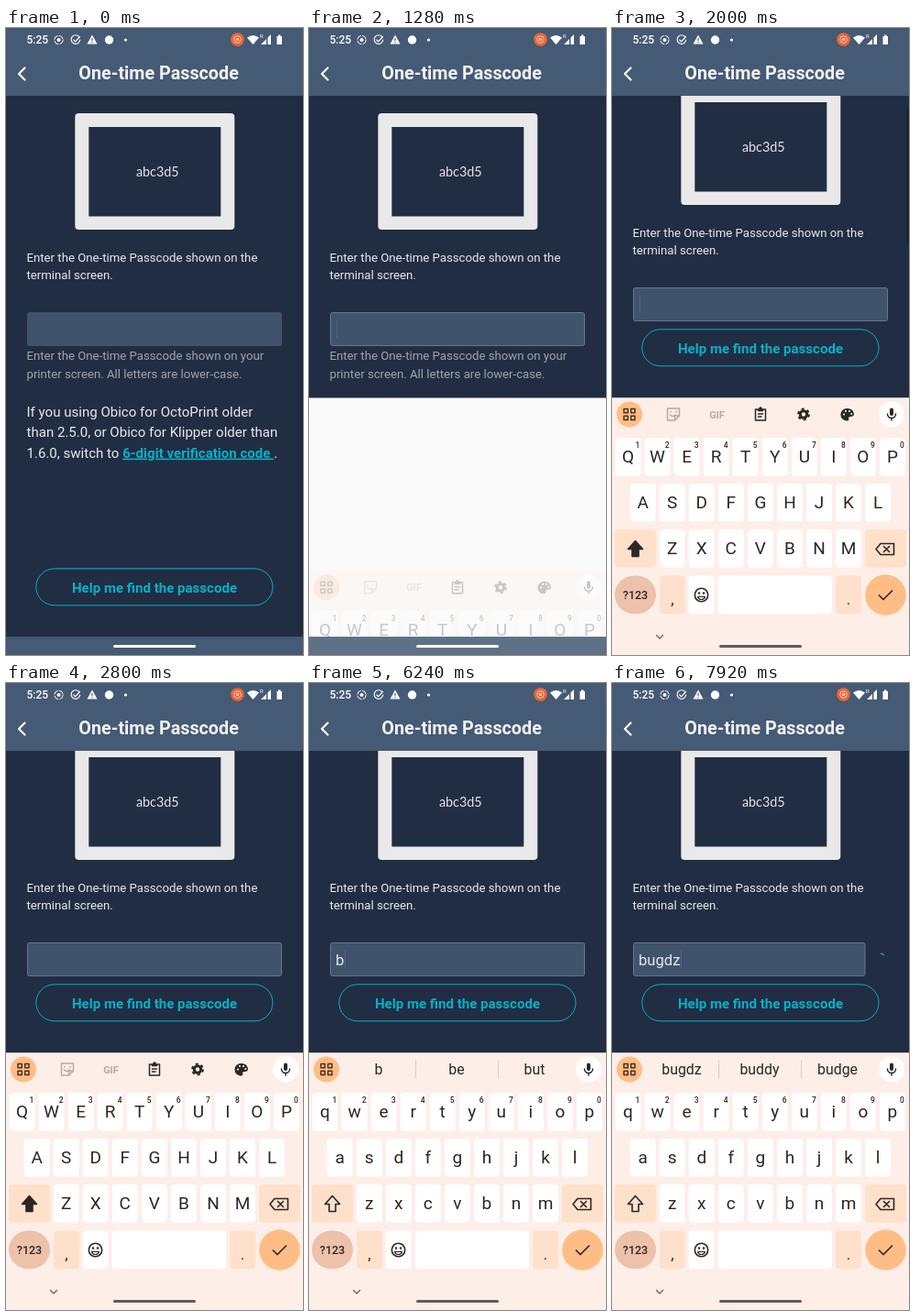
An HTML page that plays this animation: 324 by 684 pixels, repeating every 8000 ms.

```html
<!DOCTYPE html>
<html lang="en">
<head>
<meta charset="utf-8">
<title>One-time Passcode</title>
<style>
  html, body { margin: 0; width: 100%; height: 100%; overflow: hidden; background: #212d42; }
  svg { display: block; width: 324px; height: 684px; font-family: Roboto, sans-serif; }
  text { white-space: pre; }
  .mid { text-anchor: middle; }
  .line { fill: none; stroke-linecap: round; stroke-linejoin: round; }
</style>
</head>
<body>
<svg viewBox="0 0 324 684">
  <defs>
    <clipPath id="view"><rect id="viewBox" y="74" width="324" height="590"/></clipPath>
  </defs>
  <rect width="324" height="684" fill="#212d42"/>

  <g clip-path="url(#view)">
    <g id="page">
      <rect x="75.300" y="93" width="174" height="127" rx="4" fill="#e9e9e9"/>
      <rect x="90.300" y="108" width="144" height="97.500" fill="#212d42"/>
      <text class="mid" x="165.300" y="162" font-family="Lato, sans-serif" font-size="14.400" fill="#e3e5e8">abc3d5</text>
      <g font-size="13.200" fill="#e8eaee">
        <text x="22.500" y="254.500">Enter the One-time Passcode shown on the</text>
        <text x="22.500" y="274.300">terminal screen.</text>
      </g>
      <rect id="field" x="23.500" y="310.500" width="277" height="36" rx="2" fill="#40536c" stroke="#40536c"/>
      <text id="typed" x="29" y="335" font-size="16.600" fill="#e3e7ec"></text>
      <rect id="caret" y="318" width="1" height="20" fill="#4d6682"/>
      <path id="spinner" class="line" stroke="#06b1c9" stroke-width="1.200"/>
      <g font-size="13.200" fill="#a0a5ad">
        <text x="22.500" y="362">Enter the One-time Passcode shown on your</text>
        <text x="22.500" y="382">printer screen. All letters are lower-case.</text>
      </g>
      <g font-size="15.050" fill="#e8eaee">
        <text x="22.500" y="424">If you using Obico for OctoPrint older</text>
        <text x="22.500" y="446.300">than 2.5.0, or Obico for Klipper older than</text>
        <text x="22.500" y="468.600">1.6.0, switch to <tspan font-weight="700" fill="#06b1c9" text-decoration="underline">6-digit verification code </tspan>.</text>
      </g>
    </g>
  </g>
  <rect id="scrollbar" x="321" y="88" width="3" height="147" rx="1" fill="#182131"/>

  <g id="help">
    <rect x="32.800" y="589.800" width="258.200" height="40" rx="20" fill="none" stroke="#06b1c9"/>
    <text class="mid" x="162" y="615.500" font-size="15.050" font-weight="700" fill="#06b1c9">Help me find the passcode</text>
  </g>

  <rect width="324" height="74" fill="#455a74"/>
  <path class="line" d="M20.500 43.500L14 50L20.500 56.500" stroke="#fff" stroke-width="2.200"/>
  <text class="mid" x="166.600" y="56.300" font-size="19.750" font-weight="700" fill="#f0f2f5">One-time Passcode</text>
  <g fill="#fff">
    <text x="22.500" y="17" font-size="12" font-weight="500">5:25</text>
    <circle cx="57.500" cy="13" r="4.700" fill="none" stroke="#fff" stroke-dasharray="6 1.400"/>
    <circle cx="57.500" cy="13" r="2"/>
    <path class="line" stroke="#fff" stroke-width="1.200" d="M80 10A4.800 4.800 0 1 0 80.700 13M73.800 13L75.600 14.800L80.500 9.500"/>
    <path d="M94 7.500L99.500 17.500H88.500Z"/>
    <path d="M94 11V14M94 15V16.200" stroke="#455a74" stroke-width="1.200"/>
    <circle cx="112.500" cy="13" r="4.700"/>
    <circle cx="130.500" cy="13" r="1.600"/>
    <circle cx="252.500" cy="12.500" r="7.300" fill="#e8653a"/>
    <circle cx="252.500" cy="12.500" r="3.800" fill="none" stroke="#fbd5c6" stroke-width=".9"/>
    <circle cx="252.500" cy="12.500" r="1.600" fill="#fbd5c6"/>
    <path d="M263 10.500Q269.500 5.500 276 10.500L269.500 18Z"/>
    <text x="277" y="11" font-size="6">R</text>
    <path d="M278 18L284 12V18ZM285.500 18V10.500L289 7V18Z"/>
    <path d="M295.500 9H297V7.500H299.500V9H301V18H295.500Z"/>
  </g>

  <rect id="panel" y="403.500" width="324" height="281" fill="#fafafa"/>
  <g id="keyboard"></g>
  <rect id="navBar" y="664" width="324" height="20" fill="#455a74"/>
  <rect id="pill" x="117" y="673" width="90" height="3" rx="1.500"/>
</svg>
<script>
const el = id => document.getElementById(id);
const set = (id, attrs) => { for (const k in attrs) el(id).setAttribute(k, attrs[k]); };
const show = (id, on) => set(id, { visibility: on ? 'visible' : 'hidden' });
const ramp = (t, from, to) => Math.min(1, Math.max(0, (t - from) / (to - from)));

const INK = '#2b2725', PEACH = '#ffe0cb', ORANGE = '#ffbd86';
const label = (x, y, size, text, extra = '') =>
  `<text class="mid" x="${x}" y="${y}" font-size="${size}" fill="${INK}" ${extra}>${text}</text>`;
const key = (x, y, w, fill = '#fff', r = 4) =>
  `<rect x="${x}" y="${y}" width="${w}" height="41.500" rx="${r}" fill="${fill}"/>`;
const icon = (d, color = INK, width = 1.500) =>
  `<path class="line" d="${d}" stroke="${color}" stroke-width="${width}"/>`;
const dots = (r, fill, ...points) =>
  points.map(([x, y]) => `<circle cx="${x}" cy="${y}" r="${r}" fill="${fill}"/>`).join('');

function letterRow(letters, x, y, digits) {
  return [...letters].map((c, i) => {
    const cx = x + i * 32.05;
    return key(cx - 14, y, 28) + label(cx, y + 27.3, 19, c, 'data-letter') +
      (digits ? label(cx + 10.5, y + 11, 8.5, (i + 1) % 10, 'font-weight="500"') : '');
  }).join('');
}

const tools =
  icon('M60.500 415H73.500V423L68.500 428H60.500ZM73.500 423H68.500V428M63.500 422Q66 425 69 422M64 418.500V419M70 418.500V419', '#b5aaa6') +
  label(114.500, 425.500, 11, 'GIF', 'font-weight="700" style="fill:#b5aaa6"') +
  icon('M156.500 416H167.500V428H156.500ZM159.500 416V417.500H164.500V416M159.500 421H164.500M159.500 424H163') +
  dots(1.8, INK, [162, 415]) +
  `<circle cx="209" cy="421.500" r="3.700" fill="none" stroke="${INK}" stroke-width="3"/>
   <circle cx="209" cy="421.500" r="5.900" fill="none" stroke="${INK}" stroke-width="2" stroke-dasharray="3.100 3.080"/>` +
  `<path d="M257 415A6.800 6.800 0 1 0 257 428.500Q259 428 258 425.500Q258 424 260 424Q264 424 264 421Q263 415 257 415Z" fill="${INK}"/>` +
  dots(1.1, '#feeee8', [253, 421.5], [255, 418], [259, 418], [261.3, 421]);

const suggestions = [76, 161, 246].map(x => label(x, 426.5, 15.9, '', 'data-word')).join('') +
  icon('M116.500 412V431M206.500 412V431', '#d9cdc8', 1);

el('keyboard').innerHTML =
  '<rect y="403.500" width="324" height="281" fill="#feeee8"/>' +
  dots(14, ORANGE, [19, 421.5]) +
  icon('M13 415.500H17.300V419.800H13ZM20.700 415.500H25V419.800H20.700ZM13 423.200H17.300V427.500H13ZM20.700 423.200H25V427.500H20.700Z', '#4a3020') +
  `<g id="tools">${tools}</g><g id="suggestions">${suggestions}</g>` +
  dots(14, '#fff', [305, 421.5]) +
  `<rect x="303" y="414.500" width="4" height="8.500" rx="2" fill="${INK}"/>` +
  icon('M300.500 421A4.500 4.500 0 0 0 309.500 421M305 425.500V428') +
  letterRow('QWERTYUIOP', 17.5, 447, true) +
  letterRow('ASDFGHJKL', 33.7, 497) +
  letterRow('ZXCVBNM', 65.7, 547) +
  key(3, 547, 45, PEACH) + key(276, 547, 45, PEACH) +
  `<path id="shift" d="M25.500 559.500L33.500 568.500H29V576.500H22V568.500H17.500Z" stroke="${INK}" stroke-width="1.600" stroke-linejoin="round"/>` +
  icon('M288 568.500L293 562.500H307.500V574.500H293ZM296.500 565.500L302.500 571.500M302.500 565.500L296.500 571.500', INK, 1.6) +
  key(3, 597.500, 45, '#eec1aa', 21) + label(25.500, 623, 12.5, '?123', 'font-weight="500"') +
  key(52, 597.500, 28, PEACH) + label(66, 629, 17, ',') +
  key(83.500, 597.500, 28) +
  `<circle cx="97.500" cy="618.500" r="7.200" fill="none" stroke="${INK}" stroke-width="1.600"/>` +
  icon('M93.500 620.500H101.500Q100.500 623.500 97.500 623.500Q94.500 623.500 93.500 620.500Z', INK, 1.2) +
  dots(1.2, INK, [95, 616.5], [100, 616.5]) +
  key(115.500, 597.500, 124.500) +
  key(244, 597.500, 28, PEACH) + label(258, 629, 17, '.') +
  dots(22.3, ORANGE, [298.5, 618.5]) +
  icon('M291.500 619L296 623.500L305.500 614', INK, 1.7) +
  icon('M48.500 662.500L52 666L55.500 662.500', '#6b5f5a', 1.3);

const letters = [...document.querySelectorAll('[data-letter]')];
const words = [...document.querySelectorAll('[data-word]')];

const LOOP = 8000, FOCUS = 1200, RESIZE = 1340, LOWER = 5680, VERIFY = 7760;
const strokes = [
  [6080, 'b', 'be', 'but'],
  [6480, 'bu', 'but', 'bus'],
  [6800, 'bug', 'bugs', 'big'],
  [7360, 'bugd', 'budget', 'bugs'],
  [VERIFY, 'bugdz', 'buddy', 'budge'],
];

function draw(t) {
  // Keyboard slides up while fading in
  const rise = 1 - (1 - ramp(t, 1184, 1480) ** 2) ** 3.5;
  set('keyboard', { transform: `translate(0 ${281 * (1 - rise)})`, opacity: rise ** 1.3 });
  show('panel', t >= 1240);
  set('navBar', { opacity: 1 - ramp(t, 1260, 1400) });
  const dark = ramp(t, 1380, 1900);
  const mix = (a, b) => Math.round(a + (b - a) * dark);
  set('pill', { fill: `rgb(${mix(255, 98)},${mix(255, 92)},${mix(255, 89)})` });

  // Page shrinks and scrolls to keep the field in view
  const resized = t >= RESIZE;
  const scroll = 27 * (1 - (1 - ramp(t, RESIZE, 1520)) ** 3.5);
  set('page', { transform: `translate(0 ${-scroll})` });
  set('viewBox', { height: resized ? 246 : 590 });
  set('help', { transform: `translate(0 ${resized ? -261 : 0})` });
  set('scrollbar', { opacity: resized ? 1 - ramp(t, 1900, 2150) : 0 });

  const last = strokes.filter(s => t >= s[0]).pop();
  const text = last ? last[1] : '';
  el('typed').textContent = text;
  set('field', { stroke: t >= FOCUS ? '#65778f' : '#40536c', width: t >= VERIFY ? 252.5 : 277 });

  const blink = last ? t - last[0] : ((t - 2990) % 1015 + 1015) % 1015;
  show('caret', t >= FOCUS && blink < 507);
  set('caret', { x: text ? 29.5 + el('typed').getComputedTextLength() : 30 });

  const lower = t >= LOWER;
  for (const n of letters) {
    const c = n.textContent;
    n.textContent = lower ? c.toLowerCase() : c.toUpperCase();
  }
  set('shift', { fill: lower ? 'none' : INK });

  const hint = strokes.filter(s => t >= s[0] + 80).pop();
  show('tools', !hint);
  show('suggestions', hint);
  if (hint) words.forEach((n, i) => n.textContent = hint[i + 1]);

  // Spinner arc grows as it turns
  show('spinner', t > VERIFY);
  const age = Math.max(0, t - VERIFY), start = -1.7 + age * 0.002, end = start + age * 0.003;
  const at = a => `${292 + 7 * Math.cos(a)} ${329 + 7 * Math.sin(a)}`;
  set('spinner', { d: `M${at(start)}A7 7 0 0 1 ${at(end)}` });
}

const begin = performance.now();
function tick() {
  draw((performance.now() - begin) % LOOP);
  requestAnimationFrame(tick);
}
tick();
</script>
</body>
</html>
```
